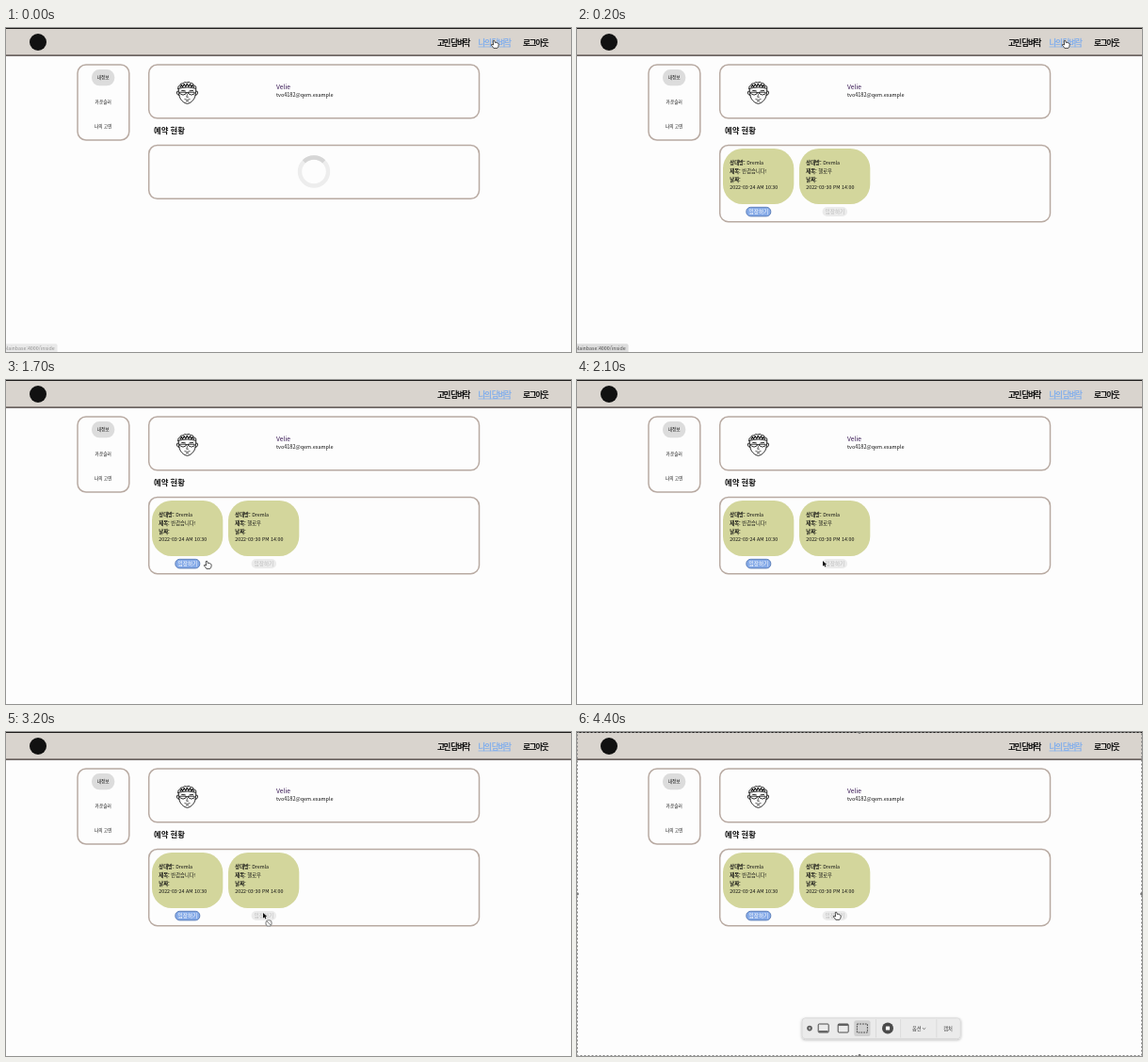
An HTML page for the animation above (4500 ms loop, 600 by 344 pixels).

```html
<!DOCTYPE html>
<html lang="ko">
<head>
<meta charset="utf-8">
<title>My page</title>
<style>
  html, body { margin: 0; width: 100%; height: 100%; overflow: hidden; background: #fdfdfd; }
  svg { display: block; width: 600px; height: 344px; }
  text { font: 5.3px "Noto Sans CJK KR", "Noto Sans KR", "Noto Sans CJK JP", "Noto Sans", sans-serif; fill: #111; }
  .mid { text-anchor: middle; }
  .bold { font-weight: 700; }
  .nav text { font-size: 8.6px; font-weight: 900; letter-spacing: -1.3px; }
  .nav .active { fill: #86b0ea; }
  .side text { font-size: 4.7px; text-anchor: middle; }
  .panel { fill: #fdfdfd; stroke: #b8aaa2; stroke-width: 1.5; }
  .button { font-size: 5.7px; text-anchor: middle; }
  .line { fill: none; stroke: #161616; stroke-width: .9; stroke-linecap: round; stroke-linejoin: round; }
  .icon { fill: none; stroke: #4c4c4c; stroke-width: 1; }

  .loading, .cards, .status, .cursor, .hand, .arrow, .denied, .capture, .arc {
    animation: 4500ms step-end infinite;
  }
  .loading { animation-name: loading; }
  .cards { animation-name: cards; }
  .status { animation-name: status; }
  .cursor { animation-name: move; }
  .hand { animation-name: hand; }
  .arrow { animation-name: arrow; }
  .denied { animation-name: denied; }
  .capture { animation-name: capture; }
  .arc { animation-name: spin; transform-origin: 327px 152.5px; }

  @keyframes loading { 0% { opacity: 1 } 4.444%, 100% { opacity: 0 } }
  @keyframes cards { 0% { opacity: 0 } 4.444%, 100% { opacity: 1 } }
  @keyframes spin { 0% { transform: rotate(0deg) } 2.222%, 100% { transform: rotate(36deg) } }
  @keyframes status {
    0% { opacity: .6 }
    2.222% { opacity: .85 }
    4.444% { opacity: 1 }
    13.333% { opacity: 1; animation-timing-function: steps(4) }
    22.222% { opacity: .1 }
    24.444%, 100% { opacity: 0 }
  }
  @keyframes move {
    0% { transform: translate(518px, 13px) }
    8.888% { transform: translate(518px, 13px); animation-timing-function: steps(3) }
    15.555% { transform: translate(300px, 140px); animation-timing-function: steps(3) }
    22.222% { transform: translate(203px, 188px); animation-timing-function: steps(3) }
    28.888% { transform: translate(194px, 194px) }
    33.333% { transform: translate(194px, 194px); animation-timing-function: steps(2) }
    37.777% { transform: translate(213px, 192px); animation-timing-function: steps(5) }
    48.888% { transform: translate(273px, 192px) }
    86.666% { transform: translate(274px, 190px) }
    97.777%, 100% { transform: translate(275px, 191px) }
  }
  @keyframes hand {
    0%, 24.444%, 86.666%, 100% { opacity: 1 }
    11.111%, 39.999% { opacity: 0 }
  }
  @keyframes arrow {
    0%, 24.444%, 86.666%, 100% { opacity: 0 }
    11.111%, 39.999% { opacity: 1 }
  }
  @keyframes denied { 0%, 86.666%, 100% { opacity: 0 } 48.888% { opacity: 1 } }
  @keyframes capture {
    0% { opacity: 0 }
    88.888% { opacity: .35 }
    91.111% { opacity: .7 }
    93.333%, 100% { opacity: 1 }
  }
</style>
</head>
<body>
<svg viewBox="0 0 600 344">
  <defs>
    <filter id="shadow" x="-10%" y="-40%" width="120%" height="190%">
      <feDropShadow dx="0" dy="1" stdDeviation="1.6" flood-opacity=".3"/>
    </filter>
  </defs>
  <rect width="600" height="344" fill="#fdfdfd"/>

  <rect width="600" height="29" fill="#d9d4ce"/>
  <path d="M0 .5H600" stroke="#1c1a19"/>
  <path d="M0 29.2H600" stroke="#3c3330" stroke-width="1.2"/>
  <circle cx="34" cy="15" r="9" fill="#111"/>
  <g class="nav">
    <text x="458" y="19">고민 담벼락</text>
    <text class="active" x="501.5" y="19">나의 담벼락</text>
    <path d="M501.5 20H535.5" stroke="#86b0ea" stroke-width=".8"/>
    <text x="549" y="19">로그아웃</text>
  </g>

  <g class="side">
    <rect class="panel" x="76" y="39" width="54.8" height="80" rx="9"/>
    <rect x="91" y="44" width="24.3" height="17.3" rx="8.2" fill="#dcdcdc"/>
    <text x="103.2" y="54.2">내정보</text>
    <text x="103.2" y="80.2">카운슬러</text>
    <text x="103.2" y="106.2">나의 고민</text>
  </g>

  <rect class="panel" x="151.7" y="39" width="350.8" height="56.8" rx="9"/>
  <g class="line">
    <path d="M183.3 65C183 72 185 77 190 79.6Q192.5 81.2 195 79.6C200 77 202 72 201.7 65" fill="#fff"/>
    <path d="M183.4 67q-2.4-.6-2 2t2.6 2.4M201.6 67q2.4-.6 2 2t-2.6 2.4"/>
    <path d="M182.7 64.5q-.7-3 2-3.5q.2-2.6 3.2-2.2q1.7-2.1 4-.8q2.6-1.6 4.2.5q3-.2 3.2 2.2q3.3.6 2.6 3.8q-9-3-19.2 0Z" fill="#fff"/>
    <path d="M185 63l1.4-2.4 1.2 2 1.6-3 1.6 2.7 1.5-3 1.6 3 1.6-2.7 1.4 3 1.2-2 1.6 2.4" stroke-width="1.1"/>
    <path d="M184.8 68.2h6.4v1.6q-3 2.8-6.4 0ZM193.8 68.2h6.4v1.6q-3.4 2.8-6.4 0ZM191.2 68.7h2.6M186.6 66.4l3.6.4M195 66.8l3.6-.4"/>
    <path d="M192.6 70.5l-.9 2.8h1.8M189.8 75.6q2.8 1.4 5.4 0M191.3 77.7h2.4" stroke-width=".7"/>
  </g>
  <text x="287" y="65" style="font-size:6.8px;fill:#3a1a55">Velie</text>
  <text x="287" y="73.2" style="font-size:5.5px">tvo4182@qem.example</text>
  <text class="bold" x="157" y="112.4" style="font-size:8.3px">예약 현황</text>

  <g class="loading">
    <rect class="panel" x="151.7" y="124.5" width="350.8" height="56.8" rx="9"/>
    <g fill="none" stroke-width="4.4">
      <circle cx="327" cy="152.5" r="15" stroke="#ededed"/>
      <path class="arc" d="M316.4 141.9A15 15 0 0 1 337.6 141.9" stroke="#d6d6d6"/>
    </g>
  </g>

  <g class="cards">
    <rect class="panel" x="151.7" y="124.5" width="350.8" height="81.2" rx="9"/>
    <g>
      <rect x="155" y="128" width="75.3" height="59" rx="21" fill="#d3d69c"/>
      <text x="162.3" y="145.3"><tspan class="bold">상대방:</tspan> Dremla</text>
      <text x="162.3" y="154"><tspan class="bold">제목:</tspan> 반갑습니다!</text>
      <text class="bold" x="162.3" y="162.6">날짜:</text>
      <text x="162.3" y="171.3">2022-03-24 AM 10:30</text>
      <rect x="179.8" y="190.3" width="26" height="9.6" rx="4.6" fill="#86abe8" stroke="#5478b4" stroke-width=".9"/>
      <text class="button" x="192.9" y="197.1" style="fill:#fff">입장하기</text>
    </g>
    <g transform="translate(81)">
      <rect x="155" y="128" width="75.3" height="59" rx="21" fill="#d3d69c"/>
      <text x="162.3" y="145.3"><tspan class="bold">상대방:</tspan> Dremla</text>
      <text x="162.3" y="154"><tspan class="bold">제목:</tspan> 헬로우</text>
      <text class="bold" x="162.3" y="162.6">날짜:</text>
      <text x="162.3" y="171.3">2022-03-30 PM 14:00</text>
      <rect x="179.6" y="190" width="26.4" height="10" rx="5" fill="#ebebeb"/>
      <text class="button" x="192.9" y="197.1" style="fill:#bdbdbd">입장하기</text>
    </g>
  </g>

  <g class="status">
    <rect x="-5" y="335.2" width="59.6" height="12" rx="2" fill="#dddddd"/>
    <text x="51.6" y="342" text-anchor="end" style="fill:#484848">plainbase:4000/inside</text>
  </g>

  <g class="capture">
    <rect x=".5" y=".5" width="599" height="343" fill="none" stroke="#8a8a8a" stroke-dasharray="2 2"/>
    <g fill="#777">
      <circle cx="300" cy=".5" r="1.4"/><circle cx="300" cy="343.5" r="1.4"/>
      <circle cx=".5" cy="172" r="1.4"/><circle cx="599.5" cy="172" r="1.4"/>
    </g>
    <rect x="239" y="303.7" width="168.3" height="22" rx="3.5" fill="#ebebeb" stroke="#cfcfcf" stroke-width=".6" filter="url(#shadow)"/>
    <circle cx="247" cy="314.6" r="2.8" fill="#5a5a5a"/>
    <path d="M245.9 313.5l2.2 2.2m0-2.2l-2.2 2.2" stroke="#eee" stroke-width=".7"/>
    <rect x="294.3" y="306.2" width="17.2" height="16.8" rx="2" fill="#d0d0d0"/>
    <g class="icon">
      <rect x="256.2" y="310" width="11" height="9" rx="1"/>
      <path d="M257 317.9h9.4" stroke-width="1.5"/>
      <rect x="277.2" y="310" width="11" height="9" rx="1"/>
      <path d="M277.5 311h10.4" stroke-width="1.6"/>
      <rect x="297.4" y="310" width="11" height="9" stroke-dasharray="1.8 1"/>
      <path d="M367 314.2l1.6 1.4 1.6-1.4" stroke-width=".7"/>
    </g>
    <path d="M317.5 305v19.5M343.6 305v19.5M381.8 305v19.5" stroke="#d4d4d4" stroke-width=".7"/>
    <circle cx="330" cy="314.5" r="6" fill="#4b4b4b"/>
    <rect x="327.9" y="312.4" width="4.2" height="4.2" rx=".6" fill="#fff"/>
    <text x="356" y="316.7" style="fill:#444">옵션</text>
    <text class="mid" x="394" y="316.7" style="fill:#444">캡처</text>
  </g>

  <g class="cursor">
    <path class="hand" d="M-.8.7Q0-.5.9.7L1.4 2.6Q2.4 1.9 3 2.8Q4 2.4 4.4 3.3Q5.2 3.3 5.2 4.4Q5.2 7 3.7 8.4H-.2Q-1.2 6.6-2.8 4.9Q-2.4 3.6-.4 4.9Z" fill="#fff" stroke="#222" stroke-width=".8" stroke-linejoin="round"/>
    <path class="arrow" d="M0 0V5.7L1.4 4.5 2.4 6.6 3.4 6.1 2.5 4.1H4.1Z" fill="#0a0a0a" stroke="#fff" stroke-width=".6" paint-order="stroke"/>
    <g class="denied">
      <circle cx="6" cy="10.9" r="3.1" fill="#f4f4f4" stroke="#8b8b8b" stroke-width="1.1"/>
      <path d="M3.9 8.8l4.2 4.2" stroke="#8b8b8b" stroke-width="1"/>
    </g>
  </g>
</svg>
</body>
</html>
```
